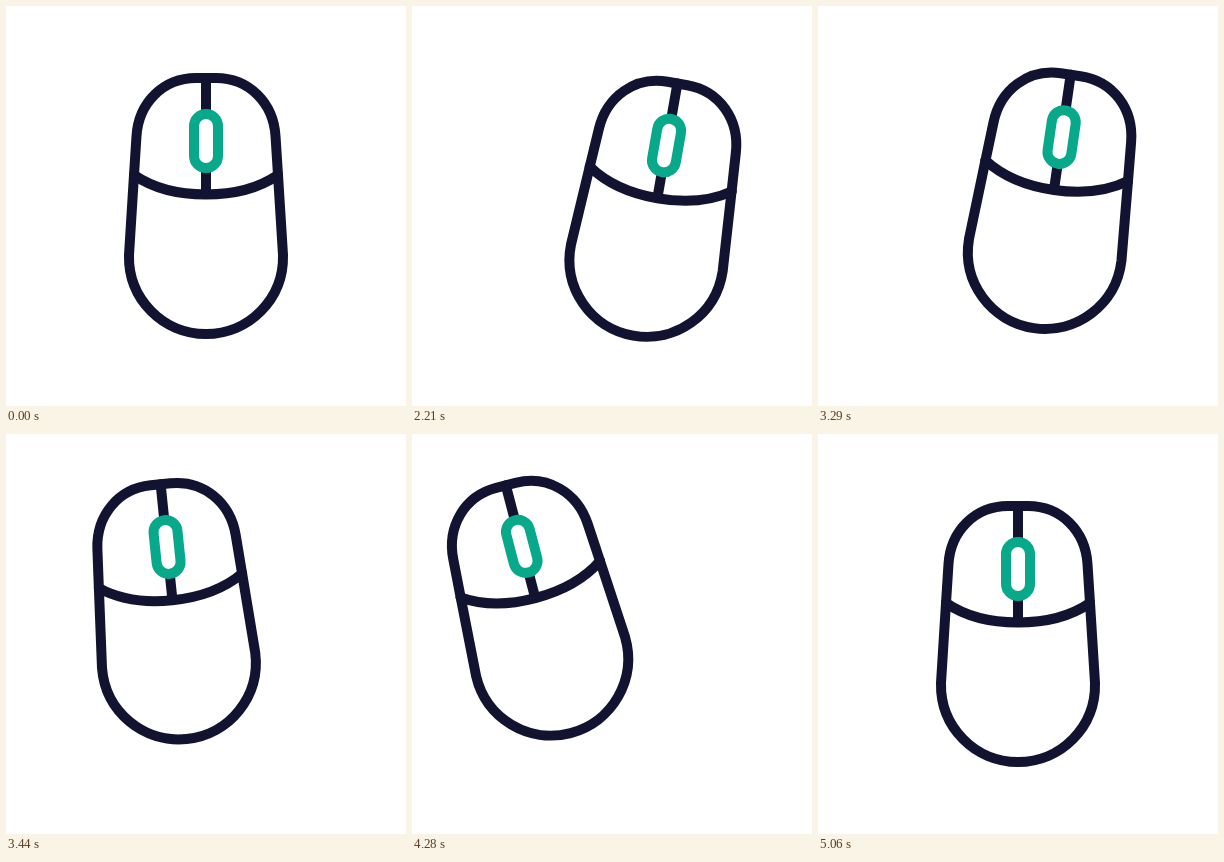
Animation of 400 by 400 pixels, one loop 5120 ms. Source, as an HTML page:

```html
<!DOCTYPE html>
<html lang="en">
<head>
<meta charset="utf-8">
<title>Mouse</title>
<style>
  html, body { margin: 0; width: 100%; height: 100%; overflow: hidden; background: #fff; }
  svg { display: block; width: 100vw; height: 100vh; }
  path, rect { fill: none; stroke: #121331; stroke-width: 10; stroke-linecap: round; stroke-linejoin: round; }
  .wheel { fill: #fff; stroke: #08a88a; }
</style>
</head>
<body>
<svg viewBox="0 0 400 400">
  <g id="mouse">
    <path id="left"/>
    <path d="M128 169 L123 249 C122 293 157 328 200 328 S278 293 277 249 L272 169"/>
    <path d="M128 169 C147 182 173 188.500 200 188.500 S253 182 272 169"/>
    <path d="M200 188 V72 H210 C243 72 267.400 97 269.500 130 L272 169"/>
    <rect class="wheel" x="188" y="108" width="24" height="54" rx="12"/>
  </g>
</svg>
<script>
const LOOP = 5120, STEP = 30, OFFSET = 20;

// Poses: centre of the round base and tilt in degrees
const home = { x: 200, y: 250, tilt: 0 };
const right = { x: 245.3, y: 253.7, tilt: 13 };
const left = { x: 137, y: 223, tilt: -15.1 };

// Bow lifts the path above the straight line
const moves = [
  { start: 2000, end: 2390, from: home, to: right, bow: 0 },
  { start: 3140, end: 3770, from: right, to: left, bow: 26 },
  { start: 4220, end: 4760, from: left, to: home, bow: 7 },
];

// Start, fully down, begin release, fully up
const clicks = [
  [2390, 2510, 2570, 2690],
  [2690, 2840, 2900, 3050],
  [3770, 3890, 3950, 4070],
  [4760, 4880, 4940, 5060],
];

// Points of the left button, up and pressed
const up = [130.5, 130, 132.6, 97, 157, 72, 190, 72, 200, 72];
const down = [133, 126, 139, 110, 158, 90, 188, 85, 200, 84];

const mix = (a, b, p) => a + (b - a) * p;
const span = (t, a, b) => Math.min(1, Math.max(0, (t - a) / (b - a)));
const smooth = s => s * s * (3 - 2 * s);

// Cubic bezier easing (0.41, 0, 0.3, 1)
function glide(x) {
  let lo = 0, hi = 1;
  for (let i = 0; i < 24; i++) {
    const s = (lo + hi) / 2, r = 1 - s;
    if (1.23 * s * r * r + 0.9 * s * s * r + s * s * s < x) lo = s;
    else hi = s;
  }
  return smooth((lo + hi) / 2);
}

function poseAt(t) {
  const m = moves.findLast(m => t >= m.start);
  if (!m) return home;
  const p = glide(span(t, m.start, m.end));
  return {
    x: mix(m.from.x, m.to.x, p),
    y: mix(m.from.y, m.to.y, p) - m.bow * p * (1 - p),
    tilt: mix(m.from.tilt, m.to.tilt, p),
  };
}

function pressAt(t) {
  const c = clicks.findLast(c => t >= c[0]);
  return c ? smooth(span(t, c[0], c[1])) - smooth(span(t, c[2], c[3])) : 0;
}

const mouse = document.getElementById('mouse');
const button = document.getElementById('left');

function draw() {
  const now = performance.now() % LOOP;
  const t = Math.floor((now - OFFSET) / STEP) * STEP + OFFSET;
  const { x, y, tilt } = poseAt(t);
  mouse.setAttribute('transform', `translate(${x} ${y}) rotate(${tilt}) translate(-200 -250)`);
  const press = pressAt(t);
  const p = up.map((v, i) => mix(v, down[i], press));
  button.setAttribute('d', `M128 169 L${p.slice(0, 2)} C${p.slice(2, 8)} L${p.slice(8)}`);
  requestAnimationFrame(draw);
}
draw();
</script>
</body>
</html>
```
